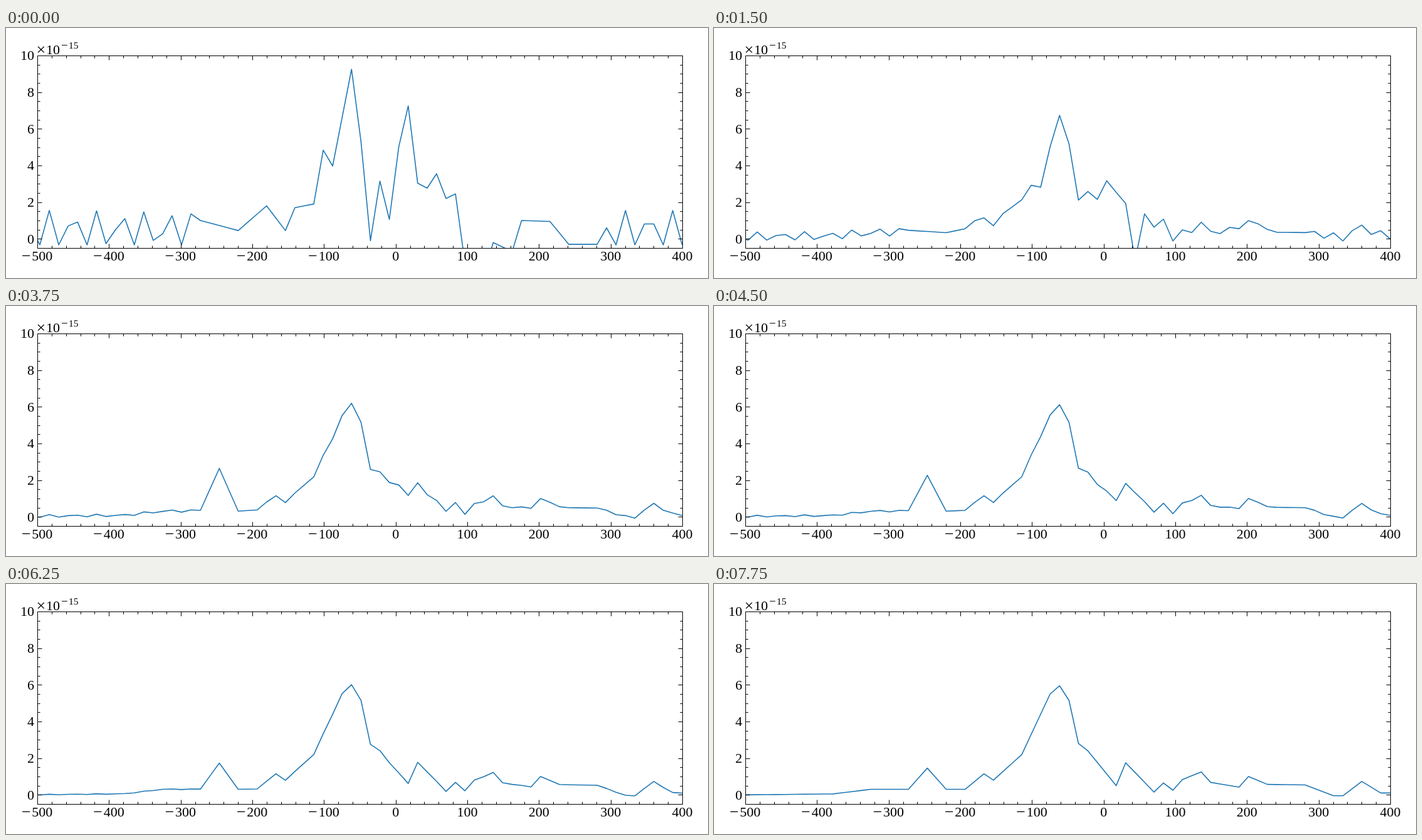
An HTML page with a canvas for the animation above (8 s loop, 1120 px wide and 400 px high).

```html
<!DOCTYPE html>
<html lang="en">
<head>
<meta charset="utf-8">
<title>Converging spectrum</title>
<style>
html, body { margin: 0; width: 100%; height: 100%; overflow: hidden; background: #fff; }
canvas { display: block; }
</style>
</head>
<body>
<canvas id="stage" width="1120" height="400"></canvas>
<script>
const ctx = document.getElementById('stage').getContext('2d');
const LEFT = 50, RIGHT = 1079, TOP = 44, BOTTOM = 352;
const LOOP = 8000, STEP = 250, STEPS = LOOP / STEP, POINTS = 69;
const xOf = v => LEFT + (v + 500) * (RIGHT - LEFT) / 900;
const yOf = v => BOTTOM - (v + 0.5) * (BOTTOM - TOP) / 10.5;
const pointX = i => 54 + i * 15.07;
const crisp = v => Math.round(v) + 0.5;

// Key points as [point, flux]; straight lines between them
const settledKeys = [
  [0, 0], [9, 0.05], [13, 0.3], [23, 0.3], [25, 1.15], [26, 0.8], [29, 2.2],
  [32, 5.5], [33, 5.95], [34, 5.15], [35, 2.8], [36, 2.4], [39, 0.5], [40, 1.75],
  [43, 0.15], [44, 0.65], [45, 0.25], [46, 0.83], [48, 1.25], [49, 0.68], [52, 0.42],
  [53, 1], [55, 0.57], [59, 0.54], [62, -0.05], [63, -0.05], [65, 0.73], [67, 0.1]];
const noisyKeys = [
  [17, 1], [21, 0.45], [24, 1.8], [26, 0.45], [27, 1.7], [29, 1.9], [30, 4.95],
  [31, 4.2], [33, 9.25], [34, 5.3], [35, -0.1], [36, 3.15], [37, 0.95], [38, 4.8],
  [39, 7.3], [40, 3.2], [41, 3.3], [42, 3.55], [43, 2.2], [44, 2.45], [45, -1.3],
  [46, -0.6], [47, -1.9], [48, -0.2], [50, -0.7], [51, 1], [54, 0.95], [56, -0.3], [59, -0.3]];

// Passing bumps: centre, half width, flux, step of the maximum, duration
const bumps = [
  [31, 2, -1.6, 7, 5],
  [38, 2, 1.3, 8, 6],
  [39.5, 1.5, -2.3, 3, 2],
  [41, 1, -2.9, 6.5, 5]];

function along(keys, i) {
  const k = keys.findIndex(key => key[0] >= i);
  if (k < 0) return keys[keys.length - 1][1];
  if (k === 0) return keys[0][1];
  const [i0, v0] = keys[k - 1], [i1, v1] = keys[k];
  return v0 + (v1 - v0) * (i - i0) / (i1 - i0);
}

const triangle = (i, centre, half) => Math.max(0, 1 - Math.abs(i - centre) / half);

// Away from the line the first curve is a ripple cut off at the bottom
function noisy(i) {
  if (i >= 17 && i < 60) return along(noisyKeys, i);
  return Math.max(-0.33, 0.45 + 1.1 * Math.cos(2 * Math.PI * (i - 1) / 2.54));
}

function flux(i, step) {
  const noise = (1 - step / (STEPS - 1)) / (1 + 0.4 * step);
  let v = along(settledKeys, i);
  v += (noisy(i) - v) * noise;
  // A single outlier enters the running average and is diluted
  if (step >= 13) v += 37 / (step + 1) * triangle(i, 19, 2);
  for (const [centre, half, size, peak, span] of bumps) {
    v += size * triangle(i, centre, half) * Math.exp(-(((step - peak) / span) ** 2));
  }
  return v;
}

function line(x1, y1, x2, y2) {
  ctx.beginPath();
  ctx.moveTo(x1, y1);
  ctx.lineTo(x2, y2);
  ctx.stroke();
}

function text(str, x, y, align = 'left', size = 22) {
  ctx.font = `${size}px "Liberation Serif", serif`;
  ctx.textAlign = align;
  ctx.fillText(str, x, y);
}

function drawAxes() {
  const [left, right, top, bottom] = [LEFT, RIGHT, TOP, BOTTOM].map(crisp);
  ctx.strokeStyle = ctx.fillStyle = '#000';
  ctx.lineWidth = 1;
  ctx.strokeRect(left, top, right - left, bottom - top);

  for (let v = -500; v <= 400; v += 20) {
    const x = crisp(xOf(v)), len = v % 100 ? 4 : 7;
    line(x, top, x, top + len);
    line(x, bottom, x, bottom - len);
  }
  for (let v = -0.5; v <= 10; v += 0.5) {
    const y = crisp(yOf(v)), len = v % 2 ? 4 : 7;
    line(left, y, left + len, y);
    line(right, y, right - len, y);
  }

  for (let v = -500; v <= 400; v += 100) {
    const x = xOf(v);
    if (v < 0) {
      text('−', x - 25, 373, 'left', 26);
      text(-v, x + 24.3, 372.3, 'right');
    } else {
      text(v, x, 372.3, 'center');
    }
  }
  for (let v = 0; v <= 10; v += 2) text(v, 45, yOf(v) + 7.2, 'right');
  text('×', 48.5, 42.5, 'left', 26);
  text('10', 64, 41.8);
  text('−', 88, 33.8, 'left', 19);
  text('15', 115.5, 33.3, 'right', 15.5);
}

function drawCurve(step) {
  ctx.save();
  ctx.beginPath();
  ctx.rect(LEFT, TOP, RIGHT - LEFT, BOTTOM - TOP);
  ctx.clip();
  ctx.strokeStyle = '#1f77b4';
  ctx.lineWidth = 1.6;
  ctx.lineJoin = 'round';
  ctx.beginPath();
  for (let i = -1; i < POINTS; i++) ctx.lineTo(pointX(i), yOf(flux(i, step)));
  ctx.stroke();
  ctx.restore();
}

function frame() {
  ctx.fillStyle = '#fff';
  ctx.fillRect(0, 0, 1120, 400);
  drawCurve(Math.floor(performance.now() % LOOP / STEP));
  drawAxes();
  requestAnimationFrame(frame);
}
frame();
</script>
</body>
</html>
```
